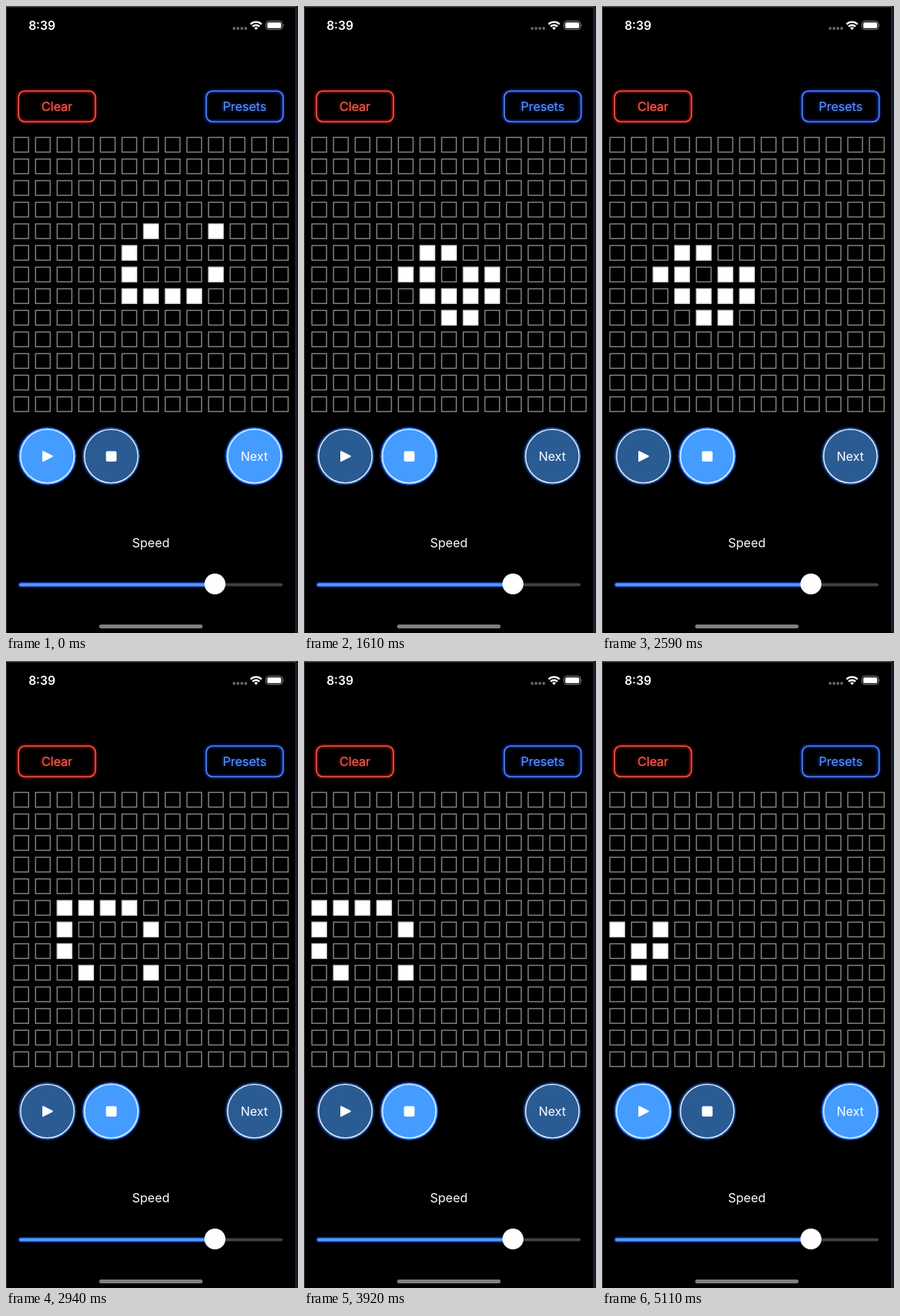
An HTML page for the animation above (5.18 s loop, 378x812 px).

```html
<!DOCTYPE html>
<html lang="en">
<head>
<meta charset="utf-8">
<title>Game of Life</title>
<style>
  html, body { margin: 0; width: 100%; height: 100%; overflow: hidden; background: #000; }
  svg { display: block; width: 378px; height: 812px; }
  text { font: 400 16px Inter, Roboto, sans-serif; text-anchor: middle; fill: #fff; }
  .time { font-size: 15.5px; font-weight: 600; }
  .cell { fill: #000; stroke: #8c938e; stroke-width: 1.3; }
  .cell.alive { fill: #fff; stroke: #dcd8e0; }
  .disc { fill: #2b5b93; }
  .on .disc { fill: #449cff; }
  .halo { fill: #123fd0; opacity: .8; }
  .on .halo { fill: #1448ff; opacity: 1; }
  .ring { fill: none; stroke: #e9f3ff; stroke-width: 1.4; }
</style>
</head>
<body>
<svg viewBox="0 0 378 812">
  <defs>
    <filter id="soft" x="-30%" y="-30%" width="160%" height="160%"><feGaussianBlur stdDeviation="1.6"/></filter>
    <filter id="track" filterUnits="userSpaceOnUse" x="8" y="738" width="280" height="24"><feGaussianBlur stdDeviation="1.3"/></filter>
  </defs>
  <rect width="378" height="812"/>
  <rect width="378" height="1.5" fill="#505052"/>
  <rect width="1" height="812" fill="#39393b"/>
  <rect x="374.5" width="1.2" height="812" fill="#3a3c42"/>
  <rect x="375.7" width="2.3" height="812" fill="#111a2e"/>

  <text class="time" x="46.5" y="30.5">8:39</text>
  <g fill="#646468" id="dots"></g>
  <g fill="none" stroke="#fff" stroke-width="2.3">
    <path d="M316.6 23.6a10 10 0 0 1 14.2 0M319.2 26.6a6.4 6.4 0 0 1 9 0"/>
    <path d="M323.7 31l-2.4-2.5a3.5 3.5 0 0 1 4.8 0z" fill="#fff" stroke="none"/>
  </g>
  <rect x="336.6" y="19.6" width="21.3" height="10.8" rx="3.2" fill="none" stroke="#858587" stroke-width="1"/>
  <rect x="338.2" y="21.2" width="18.1" height="7.6" rx="1.9" fill="#fff"/>
  <path d="M359.2 23.2q1.6 1.8 0 3.7z" fill="#858587"/>

  <g id="pills"></g>
  <g id="grid"></g>
  <g id="discs"></g>

  <text x="187.5" y="700.5">Speed</text>
  <rect x="16" y="746.5" width="256" height="6" rx="3" fill="#1238e8" filter="url(#track)"/>
  <rect x="17" y="747.5" width="341" height="4" rx="2" fill="#414145"/>
  <rect x="17" y="747.5" width="254" height="4" rx="2" fill="#4a9dfc"/>
  <circle cx="270.5" cy="748.5" r="13.6" fill="#fff"/>
  <rect x="120.5" y="801" width="134" height="5" rx="2.5" fill="#7f7f83"/>
</svg>
<script>
const NS = 'http://www.w3.org/2000/svg';
const LOOP = 5180, TICK = 70;
const START = 1230, STOP = 4830, PERIOD = 265;
const SIZE = 13, GENS = 13;

const byId = id => document.getElementById(id);
function add(parent, tag, attrs, text) {
  const el = document.createElementNS(NS, tag);
  for (const k in attrs) el.setAttribute(k, attrs[k]);
  if (text) el.textContent = text;
  parent.appendChild(el);
  return el;
}

for (let i = 0; i < 4; i++) add(byId('dots'), 'circle', { cx: 295.3 + i * 5, cy: 29, r: 1.9 });

function pill(x, label, color, glow) {
  const g = byId('pills');
  const box = { x, y: 110.2, width: 99.5, height: 39.6, rx: 8, fill: 'none' };
  const mid = x + 49.8;
  add(g, 'rect', { ...box, x: x - .6, stroke: glow, 'stroke-width': 3, filter: 'url(#soft)' });
  add(g, 'rect', { ...box, stroke: color, 'stroke-width': 1.3 });
  add(g, 'text', { x: mid - 1.5, y: 136, style: `fill:${glow}`, filter: 'url(#soft)' }, label);
  add(g, 'text', { x: mid, y: 136, style: `fill:${color}` }, label);
}
pill(16.3, 'Clear', '#ec6a52', '#c01010');
pill(259.3, 'Presets', '#5b97f2', '#1238d8');

function disc(cx) {
  const g = add(byId('discs'), 'g', {}), cy = 583;
  add(g, 'circle', { class: 'halo', cx: cx - .4, cy, r: 37, filter: 'url(#soft)' });
  add(g, 'circle', { class: 'disc', cx, cy, r: 36.8 });
  add(g, 'circle', { class: 'ring', cx, cy, r: 34.6 });
  return g;
}
const play = disc(53.5), stop = disc(136.2), next = disc(321.5);
add(play, 'path', { d: 'M48 577.2v12l11.8-6z', fill: '#fff', stroke: '#fff', 'stroke-width': 2, 'stroke-linejoin': 'round' });
add(stop, 'rect', { x: 129.4, y: 576.4, width: 13.8, height: 13.6, rx: 2, fill: '#fff' });
add(next, 'text', { x: 321.3, y: 588.8 }, 'Next');

const cells = [];
for (let i = 0; i < SIZE * SIZE; i++) {
  cells.push(add(byId('grid'), 'rect', {
    class: 'cell', x: 10.2 + 28 * (i % SIZE), y: 170.2 + 28 * Math.floor(i / SIZE), width: 19, height: 19
  }));
}

// Conway's rules on a board with dead edges
function evolve(board) {
  const at = (r, c) => r >= 0 && c >= 0 && r < SIZE && c < SIZE && board[r * SIZE + c] ? 1 : 0;
  return board.map((live, i) => {
    const r = Math.floor(i / SIZE), c = i % SIZE;
    let n = -at(r, c);
    for (let y = -1; y <= 1; y++) for (let x = -1; x <= 1; x++) n += at(r + y, c + x);
    return n === 3 || (live && n === 2);
  });
}

const ship = [[4, 6], [4, 9], [5, 5], [6, 5], [6, 9], [7, 5], [7, 6], [7, 7], [7, 8]];
const first = new Array(SIZE * SIZE).fill(false);
for (const [r, c] of ship) first[r * SIZE + c] = true;
const boards = [first];
while (boards.length <= GENS) boards.push(evolve(boards[boards.length - 1]));

function render(ms) {
  const t = Math.floor((ms % LOOP) / TICK) * TICK;
  const gen = Math.max(0, Math.min(GENS, Math.floor((t - START) / PERIOD)));
  const running = t >= START && t < STOP;
  cells.forEach((el, i) => el.classList.toggle('alive', boards[gen][i]));
  play.classList.toggle('on', !running);
  next.classList.toggle('on', !running);
  stop.classList.toggle('on', running);
}

let origin = null;
function frame(now) {
  if (origin === null) origin = now;
  render(now - origin);
  requestAnimationFrame(frame);
}
render(0);
requestAnimationFrame(frame);
</script>
</body>
</html>
```
